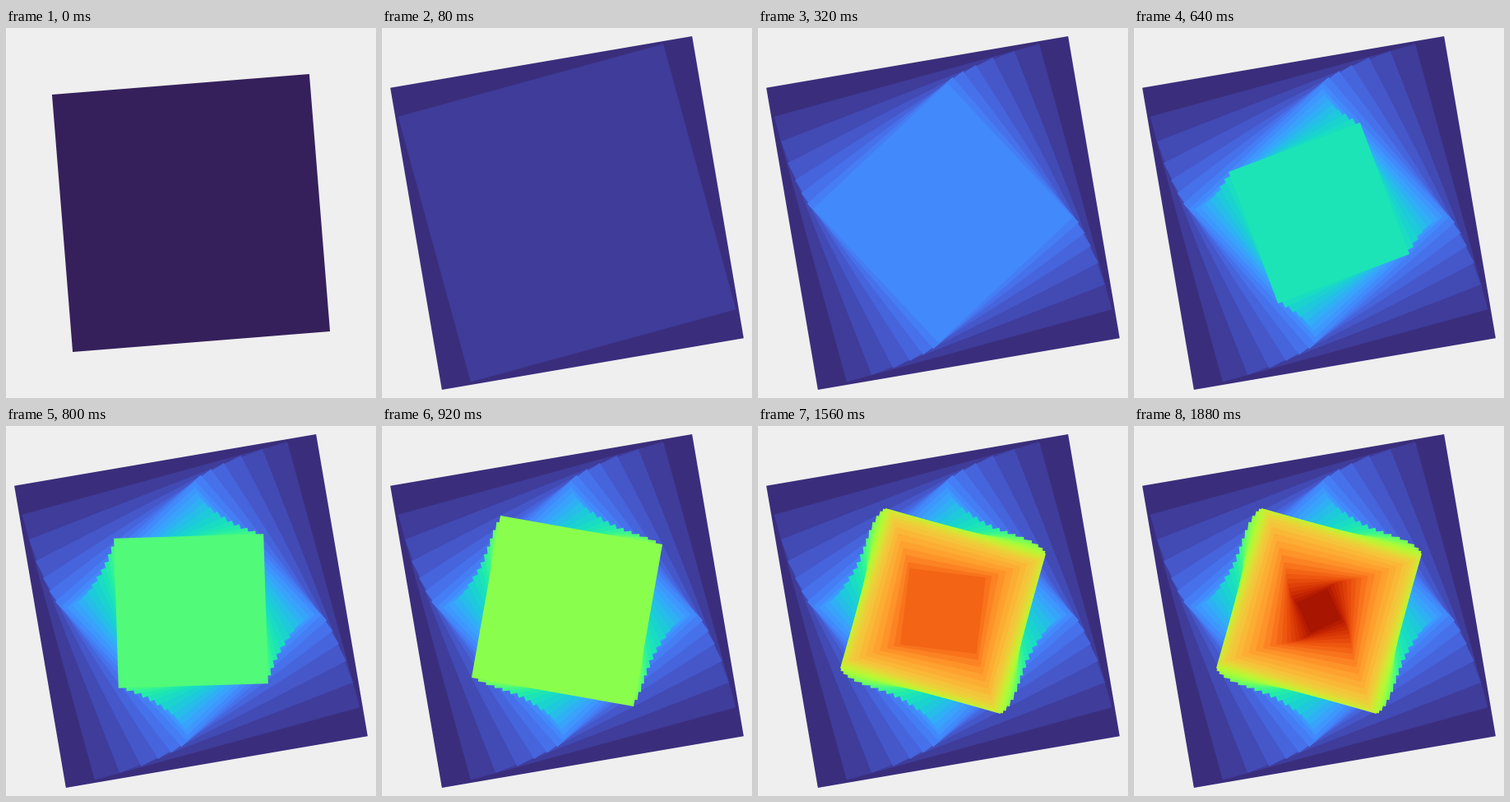
These frames come from a looping animation (450 px wide and 450 px high, 1920 ms). An HTML page with a canvas:

```html
<!DOCTYPE html>
<html lang="en">
<head>
<meta charset="utf-8">
<title>Turning squares</title>
<style>
  html, body { margin: 0; width: 100%; height: 100%; overflow: hidden; background: #efefef; }
  canvas { display: block; }
</style>
</head>
<body>
<canvas id="stage" width="450" height="450"></canvas>
<script>
const SIZE = 450, STEP = 40, COUNT = 48;
const ctx = document.getElementById('stage').getContext('2d');

// Key poses: [step, corner radius, corner angle clockwise from straight up]
const poses = [
  [0, 222, 40.4], [1, 263.3, 35.3], [2, 236.5, 29.7], [3, 215.4, 23.8], [5, 184.4, 12.5],
  [8, 158, 1.9], [12, 133, 7], [16, 120.8, 24.4], [19, 125, 38.8], [23, 141.5, 55.1],
  [26, 143.2, 60.8], [32, 124, 61.5], [39, 66, 52], [47, 29, 20.5]
];

// Even stops of the turbo colour scale
const turbo = ['30123b', '4145ab', '4675ed', '39a2fc', '1bcfd4', '24eca6', '61fc6c', 'a4fc3c',
  'd1e834', 'f3c63a', 'fe9b2d', 'f36315', 'd93806', 'b11901', '7a0402']
  .map((hex, i) => [i, ...hex.match(/../g).map(c => parseInt(c, 16))]);

// Smooth curve through keys of the form [x, ...values]
function spline(keys, x, col) {
  const last = keys.length - 1;
  let k = 0;
  while (k < last - 1 && x > keys[k + 1][0]) k++;
  const slope = n => {
    const a = keys[Math.max(n - 1, 0)], b = keys[Math.min(n + 1, last)];
    return (b[col] - a[col]) / (b[0] - a[0]);
  };
  const p = keys[k], q = keys[k + 1], h = q[0] - p[0];
  const u = (x - p[0]) / h, v = 1 - u;
  return p[col] * v * v * (1 + 2 * u) + q[col] * u * u * (1 + 2 * v)
    + h * u * v * (slope(k) * v - slope(k + 1) * u);
}

function colorAt(i) {
  const x = (i + 1) / 51 * (turbo.length - 1);
  return `rgb(${[1, 2, 3].map(c => Math.round(spline(turbo, x, c))).join(',')})`;
}

function drawSquare(i) {
  const radius = spline(poses, i, 1);
  const angle = spline(poses, i, 2) * Math.PI / 180;
  ctx.beginPath();
  for (let n = 0; n < 4; n++) {
    const a = angle + n * Math.PI / 2;
    ctx.lineTo(SIZE / 2 + radius * Math.sin(a), SIZE / 2 - radius * Math.cos(a));
  }
  ctx.fillStyle = colorAt(i);
  ctx.fill();
}

const start = performance.now();

function render() {
  const elapsed = Math.max(0, performance.now() - start);
  const step = Math.floor(elapsed / STEP) % COUNT;
  ctx.fillStyle = '#efefef';
  ctx.fillRect(0, 0, SIZE, SIZE);
  for (let i = 0; i <= step; i++) drawSquare(i);
  requestAnimationFrame(render);
}
render();
</script>
</body>
</html>
```
